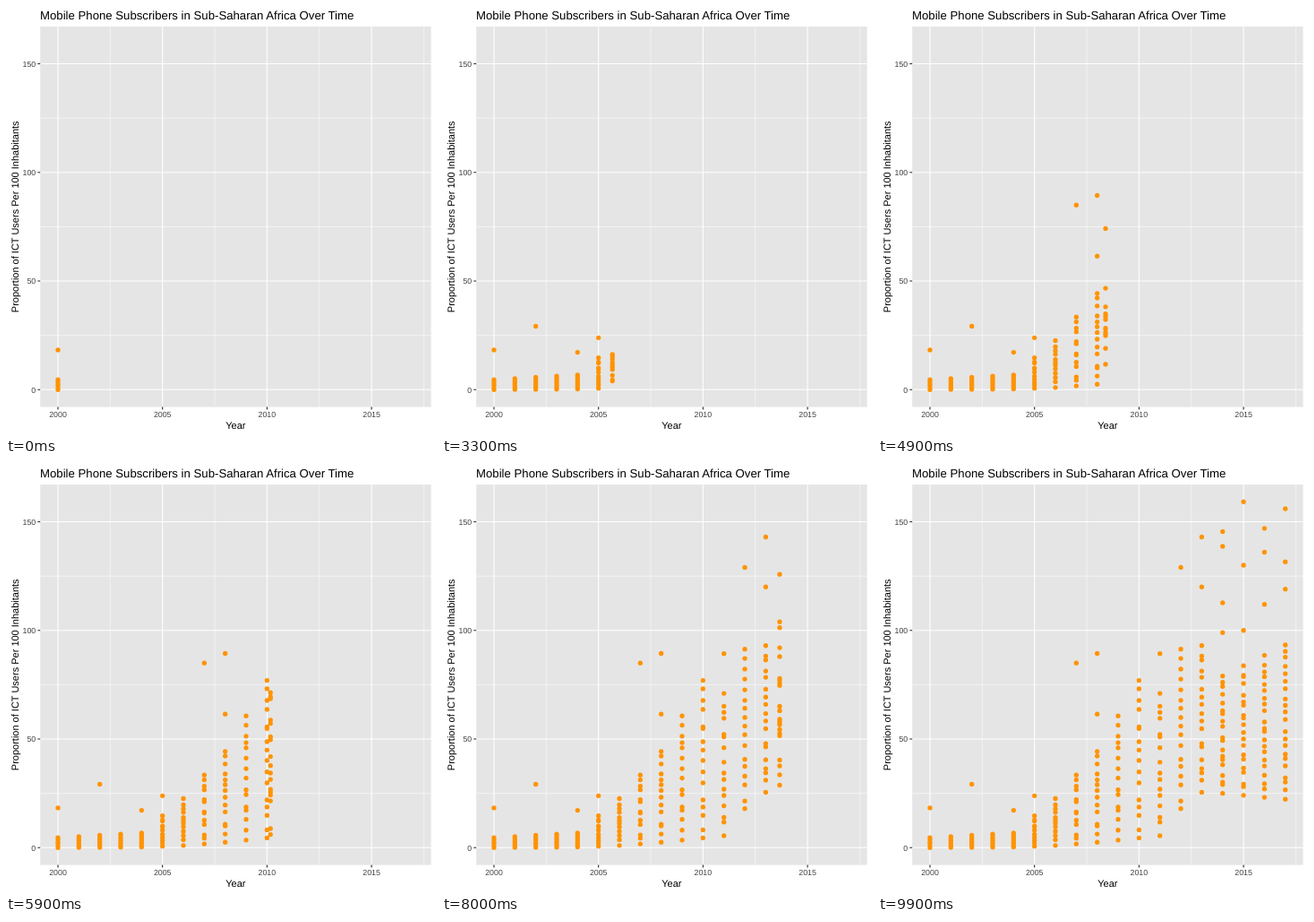
These frames come from a looping animation (480x480 px, 10 s). An HTML page:

```html
<!DOCTYPE html>
<html lang="en">
<head>
<meta charset="utf-8">
<title>Mobile phone subscribers</title>
<style>
  html, body { margin: 0; width: 100%; height: 100%; overflow: hidden; background: #fff; }
  svg { display: block; font-family: "Liberation Sans", Arial, sans-serif; text-rendering: geometricPrecision; }
  .label { font-size: 8.8px; fill: #404040; }
  .axis { font-size: 11px; text-anchor: middle; }
  #dots { fill: none; stroke: #ff9300; stroke-width: 5.3; stroke-linecap: round; }
</style>
</head>
<body>
<svg width="480" height="480" viewBox="0 0 480 480">
  <rect x="38.2" y="22.9" width="436.3" height="424.7" fill="#e5e5e5"/>
  <g id="grid"></g>
  <path id="dots"/>
  <text x="38" y="15" font-size="13.2">Mobile Phone Subscribers in Sub-Saharan Africa Over Time</text>
  <text class="axis" x="256.4" y="472">Year</text>
  <text class="axis" transform="translate(13.5 235.3) rotate(-90)">Proportion of ICT Users Per 100 Inhabitants</text>
</svg>
<script>
const FRAMES = 100, FRAME_MS = 100, FIRST = 2000, SPAN = 17;
const LEFT = 38.2, RIGHT = 474.5, TOP = 22.9, BOTTOM = 447.6;
const px = year => 58 + (year - FIRST) * 23.336;
const py = value => 428.3 - value * 2.4253;
const lerp = (a, b, t) => a + (b - a) * t;
const byId = id => document.getElementById(id);

// Range of the main crowd: year, lowest, highest.
const crowd = [
  [2000, 0, 4.6], [2004, 0.3, 6.8], [2006, 1, 22.6], [2008, 2.5, 44.3], [2010, 4.5, 77],
  [2011, 5.5, 71], [2012, 18, 91.4], [2013, 25.5, 93], [2014, 25, 79], [2017, 22.3, 93.3]
];
// Values standing far above the crowd.
const leaders = {
  2000: [18.3], 2002: [29.2], 2004: [17.2], 2005: [23.9], 2007: [85], 2008: [61.5, 89.4],
  2011: [89.3], 2012: [129], 2013: [120, 143], 2014: [99, 112.7, 138.7, 145.5],
  2015: [100, 130, 159.2], 2016: [112, 136, 147], 2017: [119, 131.6, 156]
};

let seed = 7;
const random = () => (seed = seed * 16807 % 2147483647) / 2147483647;

function shuffle(list) {
  for (let i = list.length - 1; i > 0; i--) {
    const j = Math.floor(random() * (i + 1));
    [list[i], list[j]] = [list[j], list[i]];
  }
  return list;
}

function valuesIn(year) {
  const k = Math.max(1, crowd.findIndex(knot => knot[0] >= year));
  const [a, b] = [crowd[k - 1], crowd[k]];
  const t = (year - a[0]) / (b[0] - a[0]);
  const low = lerp(a[1], b[1], t), high = lerp(a[2], b[2], t);
  const steps = Math.round(6 + 0.85 * (year - FIRST));
  const values = Array.from({ length: steps + 1 }, (_, n) => {
    const jitter = n % steps ? (random() - 0.5) * 0.9 : 0;
    return lerp(low, high, (n + jitter) / steps);
  });
  return shuffle(values.concat(leaders[year] || []));
}

const years = Array.from({ length: SPAN + 1 }, (_, i) => valuesIn(FIRST + i));
const keys = years.map((_, i) => Math.round(i * (FRAMES - 1) / SPAN));
const column = (year, values) =>
  values.map(v => `M${px(year).toFixed(2)} ${py(v).toFixed(2)}h0`).join("");

function drawGrid() {
  const line = (d, color, width) => `<path d="${d}" stroke="${color}" stroke-width="${width}"/>`;
  const across = v => `M${LEFT} ${py(v)}H${RIGHT}`;
  const down = x => `M${px(x)} ${TOP}V${BOTTOM}`;
  let minor = "", major = "", ticks = "", labels = "";
  for (let x = 2000; x <= 2015; x += 5) {
    minor += down(x + 2.5);
    major += down(x);
    ticks += `M${px(x)} ${BOTTOM}v2.8`;
    labels += `<text class="label" text-anchor="middle" x="${px(x)}" y="459">${x}</text>`;
  }
  for (let v = 0; v <= 150; v += 50) {
    if (v < 150) minor += across(v + 25);
    major += across(v);
    ticks += `M${LEFT} ${py(v)}h-2.8`;
    labels += `<text class="label" text-anchor="end" x="33.2" y="${py(v) + 3.2}">${v}</text>`;
  }
  byId("grid").innerHTML = line(minor, "#fff", 0.53) + line(major, "#fff", 1.07)
    + line(ticks, "#222", 1.07) + labels;
}

// Full years stay; between two years one column travels on to the next.
function draw(frame) {
  const i = keys.findLastIndex(key => key <= frame);
  let d = years.slice(0, i + 1).map((values, n) => column(FIRST + n, values)).join("");
  if (i < SPAN && frame > keys[i]) {
    const from = years[i], to = years[i + 1];
    const t = (frame - keys[i]) / (keys[i + 1] - keys[i]);
    const count = Math.max(from.length, to.length);
    const moving = Array.from({ length: count }, (_, n) =>
      lerp(from[n % from.length], to[n % to.length], t));
    d += column(FIRST + i + t, moving);
  }
  byId("dots").setAttribute("d", d);
}

const start = performance.now();
function tick() {
  draw(Math.floor((performance.now() - start) / FRAME_MS) % FRAMES);
  requestAnimationFrame(tick);
}
drawGrid();
tick();
</script>
</body>
</html>
```
